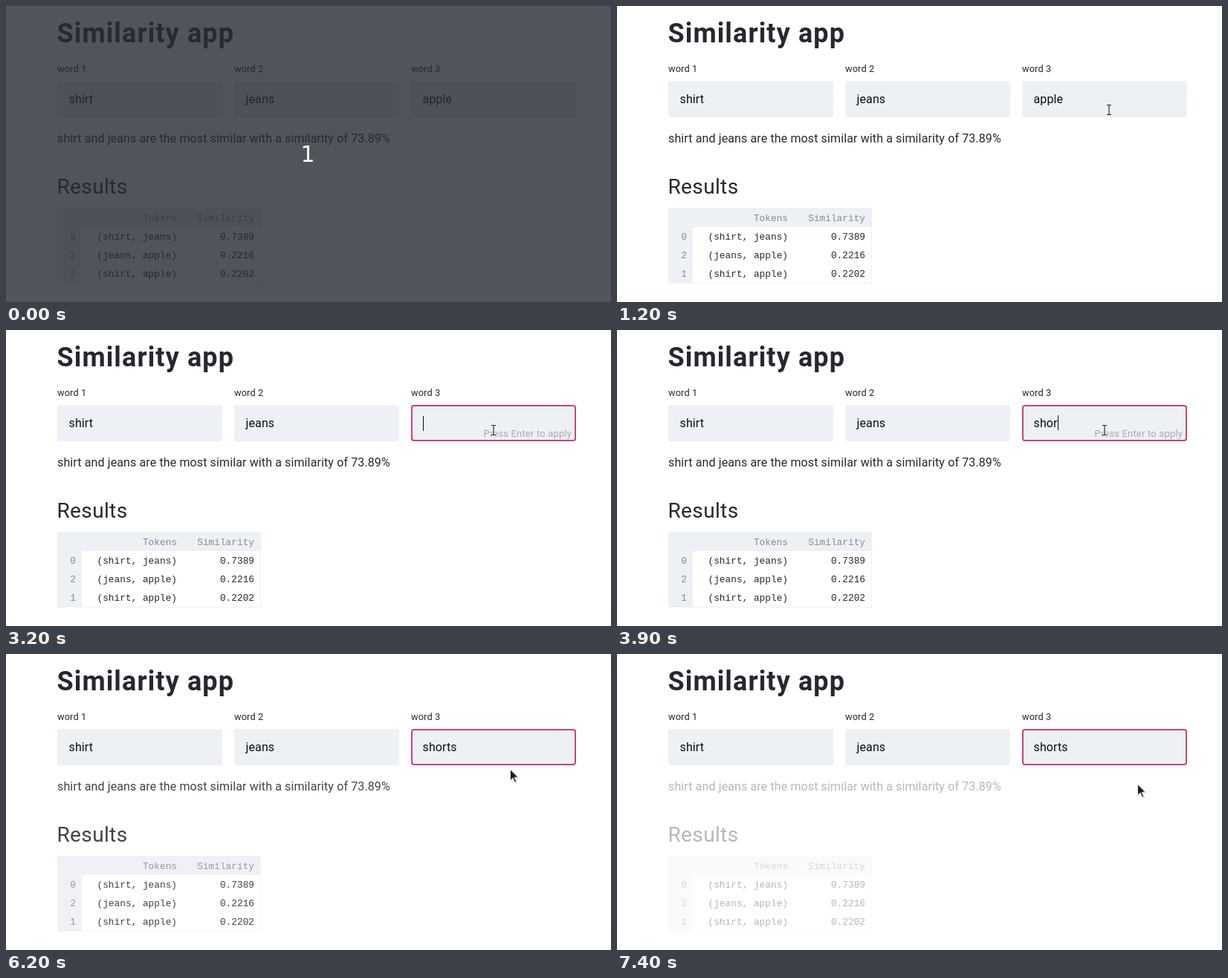
Recreate the animation shown at these times as an HTML page. Size 814x399 px, loop 8 s.

```html
<!DOCTYPE html>
<html lang="en">
<head>
<meta charset="utf-8">
<title>Similarity app</title>
<style>
  html, body { margin: 0; height: 100%; overflow: hidden; background: #fff; }
  svg { display: block; width: 814px; height: 399px; }
  text { font: 16px Roboto, sans-serif; letter-spacing: .0075em; fill: #262730; white-space: pre; }
  .title { font-size: 36px; font-weight: 700; letter-spacing: .031em; }
  .heading { font-size: 28px; letter-spacing: .013em; }
  .label { font-size: 12.8px; }
  .value { fill: #0d0e14; }
  .hint { font-size: 12.8px; letter-spacing: .02em; fill: #a6a9b1; }
  .cell, .head { font: 12.8px "Liberation Mono", monospace; letter-spacing: 0; }
  .head { fill: #888b94; }
  .right { text-anchor: end; }
  .count { font: 30px "DejaVu Sans", sans-serif; letter-spacing: 0; fill: #fff; text-anchor: middle; }
  .panel { fill: #edf0f5; }
</style>
</head>
<body>
<svg viewBox="0 0 814 399">
  <text class="title" x="68.5" y="49">Similarity app</text>
  <g id="fields"></g>
  <rect id="focus" x="546" y="102" width="220" height="47" rx="3" fill="none" stroke="#cf4370" stroke-width="2"/>
  <rect id="selection" x="560" y="114" width="41" height="22" fill="#3390ff"/>
  <text id="word" class="value" x="560.5" y="131"></text>
  <rect id="caret" width="1" height="20" fill="#0d0e14"/>
  <text id="hint" class="hint right" x="761" y="144">Press Enter to apply</text>
  <g id="results">
    <text x="69" y="184">shirt and jeans are the most similar with a similarity of 73.89%</text>
    <text class="heading" x="68.5" y="253">Results</text>
    <rect x="69.5" y="272.5" width="273" height="101" fill="#fff" stroke="#edf0f5"/>
    <path class="panel" d="M69 272H343V298H102V374H69Z"/>
    <g id="table"></g>
  </g>
  <g id="arrow">
    <path d="M0 0V16L3.8 12.6 6.5 18.6 9.3 17.4 6.6 11.5H11.6Z" transform="translate(.7 .9)" opacity=".2"/>
    <path d="M.5 .8V15.2L4 12 6.6 18 8.7 17 6.1 11.2H11Z" fill="#1b1b1b" stroke="#fff" stroke-width=".8"/>
  </g>
  <g id="beam" fill="none">
    <path d="M-3-6.5H3M0-6.5V6.5M-3 6.5H3" stroke="#fff" stroke-width="2.6"/>
    <path d="M-3-6.5H-1L0-6 1-6.5H3M0-6V6M-3 6.5H-1L0 6 1 6.5H3" stroke="#111" stroke-width="1.1"/>
  </g>
  <g id="intro">
    <rect width="814" height="399" fill="rgb(39,42,52)" opacity=".8"/>
    <text class="count" x="406" y="210">1</text>
  </g>
</svg>
<script>
const $ = id => document.getElementById(id);
const show = (id, on) => $(id).style.display = on ? '' : 'none';
const label = (cls, x, y, s) => `<text class="${cls}" x="${x}" y="${y}">${s}</text>`;

$('fields').innerHTML = ['shirt', 'jeans', ''].map((word, i) => {
  const x = 69 + 238 * i;
  return label('label', x, 89, 'word ' + (i + 1)) +
    `<rect class="panel" x="${x}" y="101" width="222" height="49" rx="3"/>` +
    label('value', x + 15.5, 131, word);
}).join('');

const rows = [
  ['', 'Tokens', 'Similarity'],
  ['0', '(shirt, jeans)', '0.7389'],
  ['2', '(jeans, apple)', '0.2216'],
  ['1', '(shirt, apple)', '0.2202']
];
$('table').innerHTML = rows.map((row, r) => row.map((s, c) =>
  label((r && c ? 'cell' : 'head') + ' right', [94, 230, 334][c], 290 + 25 * r, s)
).join('')).join('');

const LOOP = 8000, STEP = 100;
const typing = [3500, 3600, 3800, 3900, 4200, 4400];
const blinks = [[2000, 2600], [3200, 4900], [5400, 6000], [6800, 7400]];
const moves = [[400, 604, 61], [700, 680, 86], [800, 674, 80], [1000, 674, 148], [1200, 662, 140], [1300, 656, 135]];

const ramp = (t, from, to) => Math.min(1, Math.max(0, (t - from) / (to - from)));

function drawPointer(t) {
  const move = moves.filter(m => m[0] <= t).pop();
  let [, x, y] = move || [0, 0, 0];
  const leave = ramp(t, 5900, 6500);
  x += 44 * leave;
  y += 40 * leave;
  const inField = y > 101 && y < 150;
  show('arrow', move && !inField);
  show('beam', move && inField);
  for (const id of ['arrow', 'beam']) $(id).setAttribute('transform', `translate(${x} ${y})`);
}

function draw(now) {
  const t = Math.floor(now % LOOP / STEP) * STEP;
  show('intro', t < 100);
  drawPointer(t);

  const selected = t >= 1500 && t < 2000;
  const text = t < 2000 ? 'apple' : 'shorts'.slice(0, typing.filter(k => k <= t).length);
  $('word').textContent = text;
  $('word').style.fill = selected ? '#fff' : '';
  show('selection', selected);
  $('focus').style.opacity = ramp(t, 1200, 1400);
  show('hint', t >= 2000 && t < 5000);

  show('caret', blinks.some(([on, off]) => t >= on && t < off));
  $('caret').setAttribute('x', Math.floor(561 + (text && $('word').getComputedTextLength())));
  $('caret').setAttribute('y', text ? 115 : 116);

  $('results').style.opacity = 1 - .67 * ramp(t, 5900, 7000) ** 1.3;
}

const start = performance.now();
function tick() {
  draw(performance.now() - start);
  requestAnimationFrame(tick);
}
tick();
</script>
</body>
</html>
```
